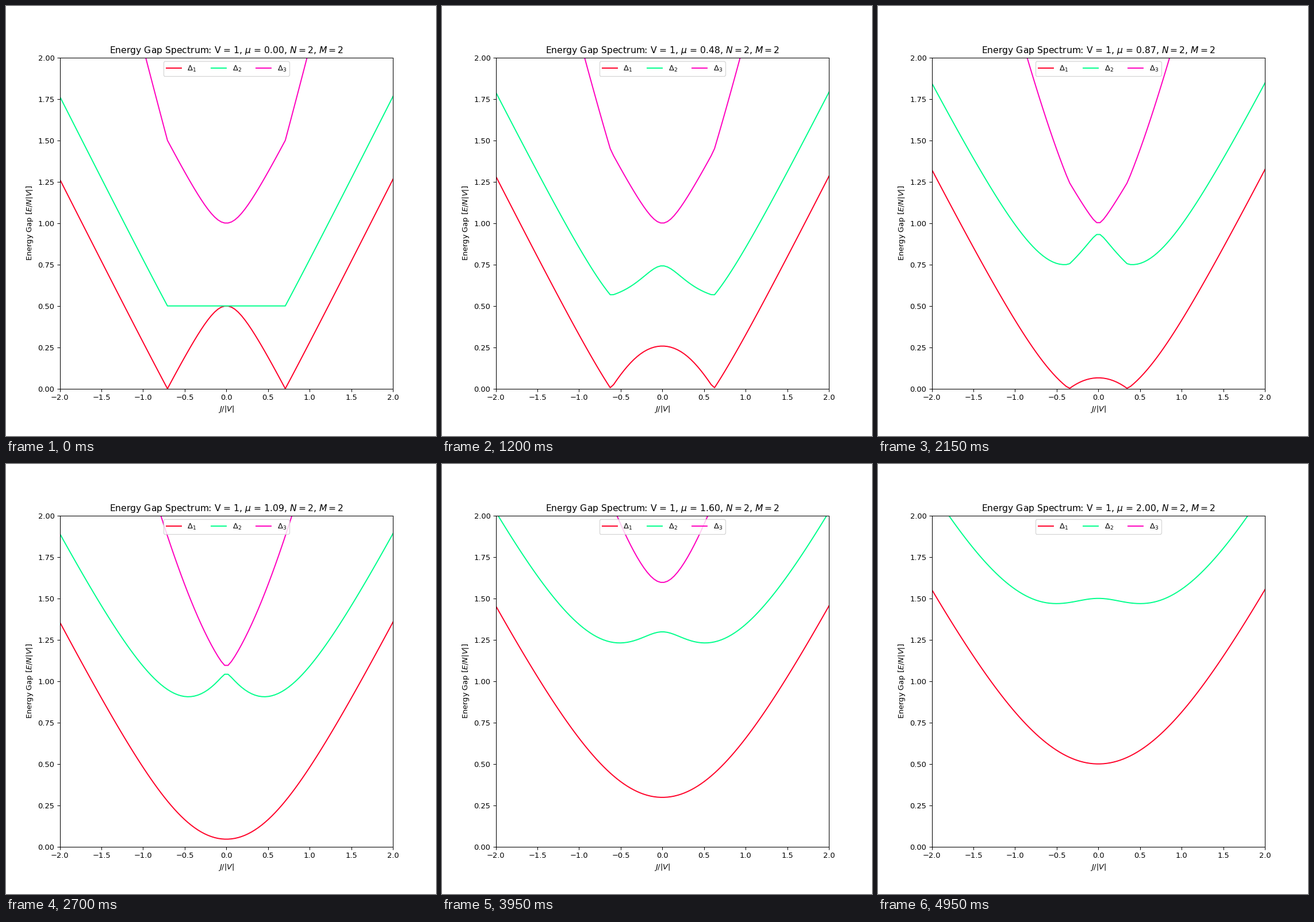
A matplotlib script for the animation above (5000 ms loop, 748 by 748 pixels).

```python
import numpy as np
import matplotlib.pyplot as plt
from matplotlib.animation import FuncAnimation

FRAMES = 100
PARTICLES = 2
V = 1

hopping = np.linspace(-2, 2, 100)
potentials = np.linspace(0, 2, FRAMES)


def gaps(mu):
    """Gaps above the ground state per particle, one row per hopping value."""
    h = np.zeros((hopping.size, 4, 4))
    h[:, 1, 1] = V - mu
    h[:, 2, 2] = V + mu
    h[:, 3, 3] = 2 * V
    for k in (1, 2):
        h[:, k, 3] = h[:, 3, k] = np.sqrt(2) * hopping
    levels = np.linalg.eigvalsh(h)
    return (levels[:, 1:] - levels[:, :1]) / PARTICLES


def title_text(mu):
    return rf"Energy Gap Spectrum: V = {V}, $\mu$ = {mu:.2f}, $N=2$, $M=2$"


fig, ax = plt.subplots(figsize=(8, 8), dpi=93.5)
colors = plt.cm.gist_rainbow(np.linspace(0, 1, 3))
lines = [
    ax.plot([], [], color=color, label=rf"$\Delta_{i}$")[0]
    for i, color in enumerate(colors, 1)
]
ax.set_xlim(-2, 2)
ax.set_ylim(0, 2)
ax.set_xlabel("$J/|V|$")
ax.set_ylabel("Energy Gap [$E/N|V|$]")
ax.legend(loc="upper center", ncol=3)
title = ax.set_title(title_text(0))


def update(frame):
    mu = potentials[frame]
    for line, gap in zip(lines, gaps(mu).T):
        line.set_data(hopping, gap)
    title.set_text(title_text(mu))
    return [*lines, title]


anim = FuncAnimation(fig, update, frames=FRAMES, interval=50, repeat=True)
plt.show()
```
